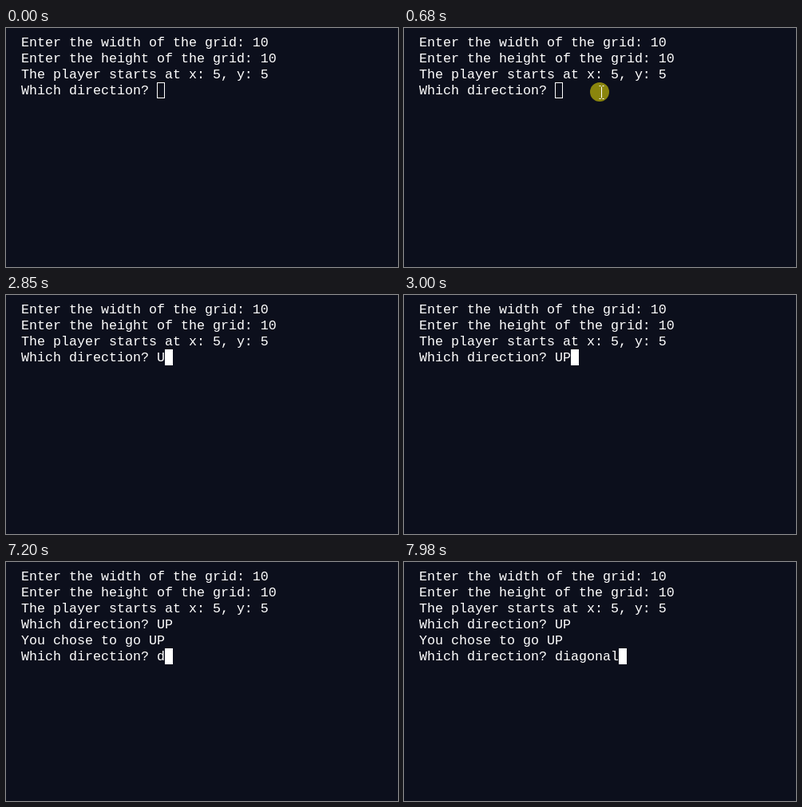
Recreate the animation shown at these times as an HTML page. Size 491x299 px, loop 8 s.

```html
<!DOCTYPE html>
<html lang="en">
<head>
<meta charset="utf-8">
<title>Grid game console</title>
<style>
  html, body { margin: 0; width: 100%; height: 100%; overflow: hidden; background: #0c0f1c; }
  pre {
    position: absolute; left: 19px; top: 9px; margin: 0;
    font: 16.667px/20px "Liberation Mono", "Courier New", monospace;
    color: #fff;
  }
  svg { position: absolute; left: 0; top: 0; }
</style>
</head>
<body>
<pre id="console"></pre>
<svg width="491" height="299">
  <rect id="caret" width="9" height="19" stroke="#fff"/>
  <g id="mouse">
    <circle r="12" fill="#fff200" fill-opacity=".52"/>
    <path d="M-.5 -7.5H1.5M3.5 -7.5H5.5M2.5 -6.5V7.5M-.5 8.5H1.5M3.5 8.5H5.5" stroke="#fff" fill="none"/>
  </g>
</svg>
<script>
const LOOP = 8000, CELL = 10, ROW = 20, LEFT = 19, TOP = 8;
const TICK = 77, ENTER = 140, CLICK = 756, LEAVE = 833, GONE = 1209;
const PROMPT = "Which direction? ";
const INTRO = [
  "Enter the width of the grid: 10",
  "Enter the height of the grid: 10",
  "The player starts at x: 5, y: 5",
];
const SUBMIT = 3700;
const UP_KEYS = [2850, 3000];
const DIAGONAL_KEYS = [7200, 7280, 7430, 7580, 7657, 7733, 7810, 7980];

const [output, caret, mouse] = ["console", "caret", "mouse"].map(id => document.getElementById(id));
const typed = (word, keys, t) => word.slice(0, keys.filter(k => t >= k).length);
const mix = (a, b, p) => a + (b - a) * p;

function linesAt(t) {
  const lines = [...INTRO, PROMPT + typed("UP", UP_KEYS, t)];
  if (t >= SUBMIT) lines.push("You chose to go UP", PROMPT + typed("diagonal", DIAGONAL_KEYS, t));
  return lines;
}

// The pointer glides in, clicks to focus the console, then leaves.
function pointerAt(t) {
  if (t < ENTER || t >= GONE) return null;
  const now = ENTER + Math.floor((t - ENTER + 1) / TICK) * TICK;
  if (now < LEAVE) {
    const p = 1 - (1 - Math.min(1, (now - ENTER) / (CLICK - ENTER - TICK))) ** 2;
    return [mix(311, 245, p), mix(192, 80, p)];
  }
  const p = (now - LEAVE) / (4 * TICK);
  return [mix(245, 314, p ** 1.4), mix(82, 181, p)];
}

function render(t) {
  const lines = linesAt(t);
  const text = lines.join("\n");
  if (output.textContent !== text) output.textContent = text;

  caret.setAttribute("x", LEFT + lines.at(-1).length * CELL + 0.5);
  caret.setAttribute("y", TOP + (lines.length - 1) * ROW + 0.5);
  caret.setAttribute("fill", t < CLICK ? "none" : "#fff");

  const at = pointerAt(t);
  mouse.style.display = at ? "" : "none";
  if (at) mouse.setAttribute("transform", `translate(${at.map(Math.round)})`);
}

const start = performance.now();
function frame() {
  render((performance.now() - start) % LOOP);
  requestAnimationFrame(frame);
}
frame();
</script>
</body>
</html>
```
